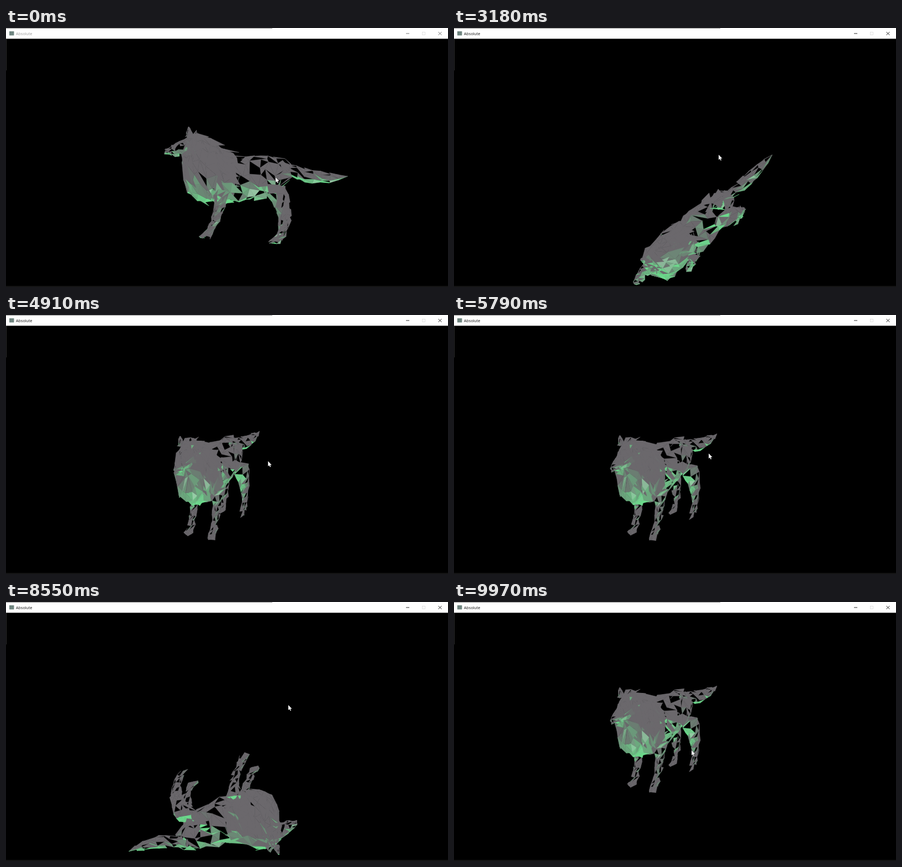
An HTML page with a canvas that plays this animation: 800 px wide and 470 px high, repeating every 10000 ms.

```html
<!DOCTYPE html>
<html lang="en">
<head>
<meta charset="utf-8">
<title>Absolute</title>
<style>
  html, body { margin: 0; width: 800px; height: 470px; overflow: hidden; background: #000; }
  canvas, svg { position: absolute; left: 0; top: 0; display: block; }
  text { font: 7.2px "Open Sans", "Noto Sans", sans-serif; }
  #bar { --ink: #999; --line: #666; }
  #bar.active { --ink: #111; --line: #111; }
  .label { fill: var(--ink); }
  .line { fill: none; stroke: var(--line); stroke-width: .9; }
</style>
</head>
<body>
<canvas id="stage" width="800" height="470"></canvas>
<svg id="bar" width="800" height="20">
  <rect width="800" height="19.5" fill="#fff"/>
  <rect width="482" height=".8" fill="#777"/>
  <rect x="6" y="6" width="8.5" height="7.5" fill="#6f8580"/>
  <text class="label" x="18" y="12.6">Absolute</text>
  <path class="line" d="M724 10h6M782.5 7l6 6m0-6l-6 6"/>
  <rect x="753.5" y="7.5" width="5" height="5" fill="none" stroke="#ddd" stroke-width=".8"/>
</svg>
<script>
const LOOP = 10000, EYE = 1700, RAD = Math.PI / 180;
const bar = document.getElementById('bar');
const ctx = document.getElementById('stage').getContext('2d');

let seed = 41;
const rnd = () => (seed = (seed * 16807) % 2147483647) / 2147483647;
const clamp = v => Math.max(0, Math.min(1, v));
const mix = (a, b, k) => a + (b - a) * k;
const dot = (a, b) => a[0] * b[0] + a[1] * b[1] + a[2] * b[2];
const sub = (a, b) => a.map((v, i) => v - b[i]);
const cross = (a, b) => [
  a[1] * b[2] - a[2] * b[1], a[2] * b[0] - a[0] * b[2], a[0] * b[1] - a[1] * b[0]];
const unit = a => { const l = Math.hypot(...a) || 1; return a.map(v => v / l); };

// Model: x to the tail, y down, z to the animal's left.
const tris = [];

// A tube along a quadratic curve, with random faces left out.
function tube([p, q, r], radius, opts) {
  const { upright = false, z = 0, flat = .8, steps = 8, n = 8,
    hole = () => .28, jitter = 2, tuft = 0 } = opts;
  const curve = (s, i) => (1 - s) ** 2 * p[i] + 2 * s * (1 - s) * q[i] + s * s * r[i];
  const mid = [], grid = [];
  for (let i = 0; i <= steps + 2; i++) {
    const s = clamp((i - 1) / steps);
    const size = i === 0 || i === steps + 2 ? 0 : radius(s);
    const x = curve(s, 0), y = curve(s, 1);
    mid.push(y);
    grid.push(Array.from({ length: n }, (_, j) => {
      const a = (j + (i % 2) / 2) / n * Math.PI * 2;
      const c = size * Math.cos(a), w = size * flat * Math.sin(a);
      const point = upright ? [x + c, y, z - w] : [x, y + c, z + w];
      return point.map(v => v + (rnd() - .5) * 2 * Math.min(jitter, size * .3));
    }));
  }
  for (let i = 0; i < grid.length - 1; i++) {
    for (let j = 0; j < n; j++) {
      const k = (j + 1) % n;
      const a = grid[i][j], b = grid[i][k], c = grid[i + 1][j], d = grid[i + 1][k];
      if (rnd() >= hole(a)) tris.push([a, b, c]);
      if (rnd() >= hole(b)) tris.push([b, d, c]);
      if (rnd() < tuft) {
        const f = 1.04 + rnd() * .1, cy = mid[i + 1];
        tris.push([a, b, [c[0] + 4 + rnd() * 10, cy + (c[1] - cy) * f, c[2] * f]]);
      }
    }
  }
}

// trunk, mane, head, tail
tube([[-50, -14], [20, -12], [82, -36]], s => 46 - 13 * s - 20 * s ** 6,
  { steps: 9, n: 15, jitter: 5, flat: .76, hole: p => p[1] < 0 ? .3 : .2 });
tube([[-113, -46], [-95, -25], [-20, -20]], s => 58 * Math.sin(.25 + 2.2 * s ** .7),
  { steps: 8, n: 15, jitter: 4, flat: .58, tuft: .5,
    hole: p => p[0] > -80 && p[1] > -5 ? .25 : .02 });
tube([[-147, -54], [-122, -58], [-92, -76]], s => 4 + 5 * clamp(4 * s) + 13 * s * s,
  { n: 11, flat: .88 });
tube([[66, -44], [120, -22], [186, -36]], s => (9 + 9 * s) * (1 - s ** 3),
  { n: 9, flat: .85 });
// ears and legs
for (const side of [-1, 1]) {
  tube([[-107, -101], [-106, -93], [-104, -84]], s => 1 + 6 * s,
    { upright: true, z: side * 13, steps: 3 });
  tube([[-38, 8], [-38, 60], [-62, 95]], s => 6.5 + 9 * (1 - s) ** 3 + 3.5 * s ** 8,
    { upright: true, z: side * 23, steps: 10 });
  tube([[52, -8], [98, 62], [64, 94]], s => 6 + 19 * (1 - s) ** 2.2 + 4 * s ** 8,
    { upright: true, z: side * 21, steps: 10, flat: .6 });
}

// Keys: time, place, then yaw, pitch and roll in degrees.
const SIDE = [430, 290, 0, 0, 4.6], FRONT = [55, 19, 0];
const MOVES = [
  [0, ...SIDE], [1640, ...SIDE],
  [2640, 440, 290, 20, 30, -5],
  [3180, 443, 366, 0, 80, -43.7],
  [4060, 451, 286, 40, 4, 0],
  [4700, 377, 293, ...FRONT],
  [5200, 385, 290, 75, 19, 0],
  [5730, 377, 293, ...FRONT], [5790, 377, 293, ...FRONT],
  [6940, 377, 213, ...FRONT], [7210, 377, 213, ...FRONT],
  [7490, 383, 245, 64, 36, 0],
  [8210, 385, 250, 20, 14, 0],
  [8550, 386, 384, 25, 30, -180],
  [8900, 520, 260, 160, 40, -40],
  [9300, 395, 235, 150, 20, 0],
  [9940, 377, 230, ...FRONT]
];
const POINTER = [
  [0, 488, 271], [580, 488, 275], [1080, 540, 310], [1580, 490, 275],
  [3180, 479, 230], [4060, 487, 279], [5790, 461, 251], [6940, 461, 171],
  [7490, 440, 261], [8550, 511, 187], [9940, 430, 269]
];

function track(keys, t) {
  const next = keys.findIndex(key => key[0] > t);
  if (next < 0) return keys[keys.length - 1].slice(1);
  const a = keys[next - 1], b = keys[next];
  const k = (t - a[0]) / (b[0] - a[0]), ease = k * k * (3 - 2 * k);
  return a.slice(1).map((v, i) => mix(v, b[i + 1], ease));
}

// The up and down drag that carries both the animal and the pointer.
const bob = t => 35 * Math.sin(3 * Math.PI * clamp((t - 5790) / 1150));

function rotate(a, b, angle) {
  const c = Math.cos(angle * RAD), s = Math.sin(angle * RAD);
  return [a * c - b * s, a * s + b * c];
}

function shade(n) {
  const g = clamp((n[1] - .22) * 1.45);
  const shine = clamp(dot(n, [.29, .66, .69])) ** 60 * .35;
  return 'rgb(' + [[107, 108], [104, 218], [108, 140]]
    .map(([a, b]) => Math.round(mix(mix(a, b, g), 255, shine))) + ')';
}

function drawWolf(t) {
  const [ox, oy, yaw, pitch, roll] = track(MOVES, t);
  const turn = ([x, y, z]) => {
    [z, x] = rotate(z, x, yaw);
    [z, y] = rotate(z, y, pitch);
    [x, y] = rotate(x, y, roll);
    return [x, y, z];
  };

  const faces = [];
  for (const tri of tris) {
    const v = tri.map(turn);
    const n = cross(sub(v[1], v[0]), sub(v[2], v[0]));
    if (dot(n, sub([0, 0, EYE], v[0])) <= 0) continue;
    faces.push({ v, n: unit(n), z: v[0][2] + v[1][2] + v[2][2] });
  }
  faces.sort((p, q) => p.z - q.z);

  ctx.lineWidth = .5;
  for (const { v, n } of faces) {
    ctx.beginPath();
    for (const [x, y, z] of v) {
      const m = EYE / (EYE - z);
      ctx.lineTo(ox + x * m, oy + bob(t) + y * m);
    }
    ctx.closePath();
    ctx.fillStyle = ctx.strokeStyle = shade(n);
    ctx.fill();
    ctx.stroke();
  }
}

const arrow = new Path2D('M0 0V9.2L2.1 7.3L3.6 10.6L5 10L3.6 6.8H6.5Z');

function drawPointer(t) {
  const [x, y] = track(POINTER, t);
  ctx.save();
  ctx.translate(x, y + bob(t));
  ctx.fillStyle = '#fff';
  ctx.strokeStyle = '#000';
  ctx.lineWidth = 1;
  ctx.stroke(arrow);
  ctx.fill(arrow);
  ctx.restore();
}

function frame() {
  const t = performance.now() % LOOP;
  bar.classList.toggle('active', t >= 580);
  ctx.fillStyle = '#000';
  ctx.fillRect(0, 0, 800, 470);
  ctx.fillStyle = '#3a3a3a';
  ctx.fillRect(0, 20, .8, 57);
  drawWolf(t);
  ctx.fillStyle = '#141414';
  ctx.fillRect(0, 468, 800, 2);
  drawPointer(t);
  requestAnimationFrame(frame);
}
frame();
</script>
</body>
</html>
```
